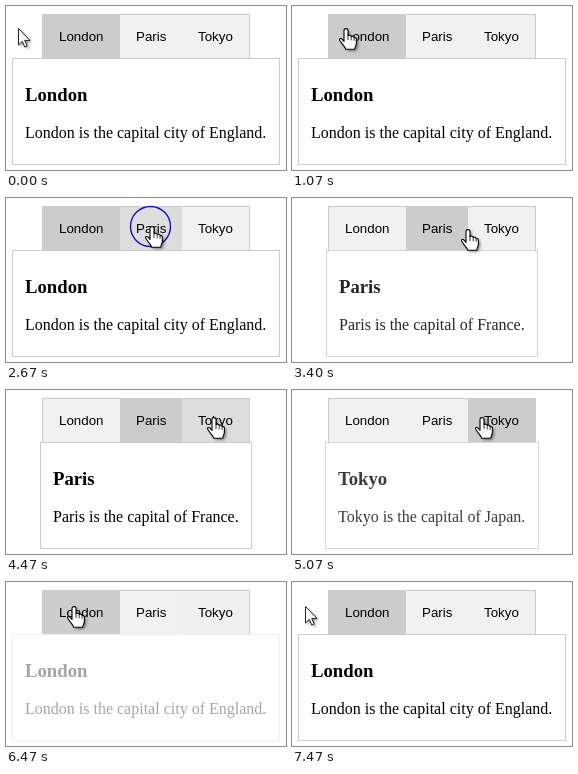
These frames come from a looping animation (280x164 px, 7540 ms). An HTML page with a canvas:

```html
<!DOCTYPE html>
<html lang="en">
<head>
<meta charset="utf-8">
<title>City tabs</title>
<style>
html, body { margin: 0; width: 100%; height: 100%; overflow: hidden; background: #fff; }
canvas { display: block; width: 280px; height: 164px; }
</style>
</head>
<body>
<canvas id="stage"></canvas>
<script>
const W = 280, H = 164, LOOP = 7540, STEP = 1000 / 15;
const canvas = document.getElementById('stage');
const ctx = canvas.getContext('2d');
const dpr = window.devicePixelRatio || 1;
canvas.width = W * dpr;
canvas.height = H * dpr;

const SANS = '13.333px "Liberation Sans", Arial, sans-serif';
const SERIF = '"Liberation Serif", "Times New Roman", serif';
const BASE = 241, HOVER = 221, ACTIVE = 204;

// shades: [time, grey] – each starts a 300 ms transition
const tabs = [
  { name: 'London', x: 37, end: 114, textX: 53,
    shades: [[-999, ACTIVE], [2840, BASE], [5490, HOVER], [6240, ACTIVE]] },
  { name: 'Paris', x: 114, end: 176, textX: 130,
    shades: [[-999, BASE], [2080, HOVER], [2840, ACTIVE], [4600, BASE], [5170, HOVER], [5490, BASE]] },
  { name: 'Tokyo', x: 176, end: 243, textX: 192,
    shades: [[-999, BASE], [3420, HOVER], [4600, ACTIVE], [6240, BASE]] }
];

const panels = [
  { at: -2000, title: 'London', text: 'London is the capital city of England.' },
  { at: 2840, title: 'Paris', text: 'Paris is the capital of France.' },
  { at: 4600, title: 'Tokyo', text: 'Tokyo is the capital of Japan.' },
  { at: 6240, title: 'London', text: 'London is the capital city of England.' }
];

// Pointer moves: start, end, control point, destination
const moves = [
  [70, 1070, [32, 24], [54, 22]],
  [1590, 2400, [100, 27], [146, 28]],
  [2760, 4070, [177, 33.5], [208, 27]],
  [4830, 5870, [138, 28], [68, 24]],
  [6730, 7470, [40, -12], [13, 24]]
];
const clicks = [1200, 2600, 4270, 6070];

const clamp = v => Math.max(0, Math.min(1, v));
const smooth = u => u * u * (3 - 2 * u);
const bez = (a, b, s) => 3 * s * (1 - s) * (1 - s) * a + 3 * s * s * (1 - s) * b + s * s * s;

// CSS "ease"
function ease(u) {
  u = clamp(u);
  if (u === 0 || u === 1) return u;
  let lo = 0, hi = 1;
  for (let i = 0; i < 18; i++) {
    const mid = (lo + hi) / 2;
    if (bez(0.25, 0.25, mid) < u) lo = mid; else hi = mid;
  }
  return bez(0.1, 1, lo);
}

function pointerAt(t) {
  let p = [12, 22];
  for (const [start, end, via, to] of moves) {
    if (t < start) break;
    const s = smooth(clamp((t - start) / (end - start)));
    p = p.map((v, i) => (1 - s) * (1 - s) * v + 2 * s * (1 - s) * via[i] + s * s * to[i]);
  }
  return p.map(Math.round);
}

function drawTabs(t) {
  ctx.fillStyle = '#ccc';
  ctx.fillRect(36, 8, 208, 44);
  ctx.font = SANS;
  for (const tab of tabs) {
    const g = Math.round(tab.shades.reduce(
      (v, [at, to]) => v + (to - v) * ease((t - at) / 300), BASE));
    ctx.fillStyle = `rgb(${g},${g},${g})`;
    ctx.fillRect(tab.x, 9, tab.end - tab.x, 43);
    ctx.fillStyle = '#000';
    ctx.fillText(tab.name, tab.textX, 35);
  }
}

// The panel's top edge also closes the tab bar
function drawPanel(t) {
  const panel = panels.filter(p => t >= p.at).pop();
  ctx.save();
  ctx.globalAlpha = ease((t - panel.at) / 1000);
  ctx.font = '16px ' + SERIF;
  const w = Math.ceil(ctx.measureText(panel.text).width) + 26;
  const x = Math.floor(140 - w / 2);
  ctx.strokeStyle = '#ccc';
  ctx.lineWidth = 1;
  ctx.strokeRect(x + 0.5, 52.5, w - 1, 106);
  ctx.fillStyle = '#000';
  ctx.fillText(panel.text, x + 13, 132);
  ctx.font = 'bold 18.72px ' + SERIF;
  ctx.fillText(panel.title, x + 13, 95);
  ctx.restore();
}

function drawClick(t, x, y) {
  const at = clicks.find(c => t >= c - 4 && t < c + 196);
  if (at === undefined) return;
  const r = 12 + 8 * Math.round((t - at) / STEP);
  ctx.strokeStyle = '#1010b8';
  ctx.lineWidth = 1.4;
  ctx.beginPath();
  ctx.arc(x - 1.5, y + 0.5, r, 0, 7);
  ctx.stroke();
}

const hand = new Path2D(
  'M-2 13.5V2.3C-2 0 2 0 2 2.3V7.6C3 6.8 5 7.1 5.2 8.5C6.4 7.8 7.9 8.3 8.1 9.6' +
  'C9.3 9.1 10.4 9.8 10.4 11.2V15C10.4 17.5 9 18.5 8.7 21.3H-.3C-.5 19-2.8 17.6-4.2 15.2' +
  'L-6.3 12.2C-7 10.7-5 9.8-3.9 11.2Z');
const knuckles = new Path2D('M2 7.6V12M5.2 8.5V12.3M8.1 9.6V12.8');
const arrow = new Path2D('M.5.5V17L4.3 13.4L6.8 19L9.2 18L6.7 12.4H12Z');

function drawPointer(x, y) {
  const onTabs = x >= 37 && x < 243 && y >= 9 && y < 52;
  const shape = onTabs ? hand : arrow;
  ctx.save();
  ctx.translate(x, y);
  ctx.lineJoin = 'round';
  ctx.save();
  ctx.shadowColor = 'rgba(0,0,0,.45)';
  ctx.shadowBlur = 3 * dpr;
  ctx.shadowOffsetX = ctx.shadowOffsetY = 1.8 * dpr;
  ctx.fillStyle = '#fff';
  ctx.fill(shape);
  ctx.restore();
  ctx.strokeStyle = onTabs ? '#000' : '#222';
  ctx.lineWidth = onTabs ? 1.1 : 1;
  ctx.stroke(shape);
  if (onTabs) {
    ctx.lineWidth = 0.8;
    ctx.stroke(knuckles);
  }
  ctx.restore();
}

function draw(now) {
  const t = Math.floor((now % LOOP + 4) / STEP) * STEP;
  ctx.setTransform(dpr, 0, 0, dpr, 0, 0);
  ctx.fillStyle = '#fff';
  ctx.fillRect(0, 0, W, H);
  drawTabs(t);
  drawPanel(t);
  const [x, y] = pointerAt(t);
  drawClick(t, x, y);
  drawPointer(x, y);
}

let origin;
function tick(now) {
  if (origin === undefined) origin = now;
  draw(Math.max(0, now - origin));
  requestAnimationFrame(tick);
}
draw(0);
requestAnimationFrame(tick);
</script>
</body>
</html>
```
